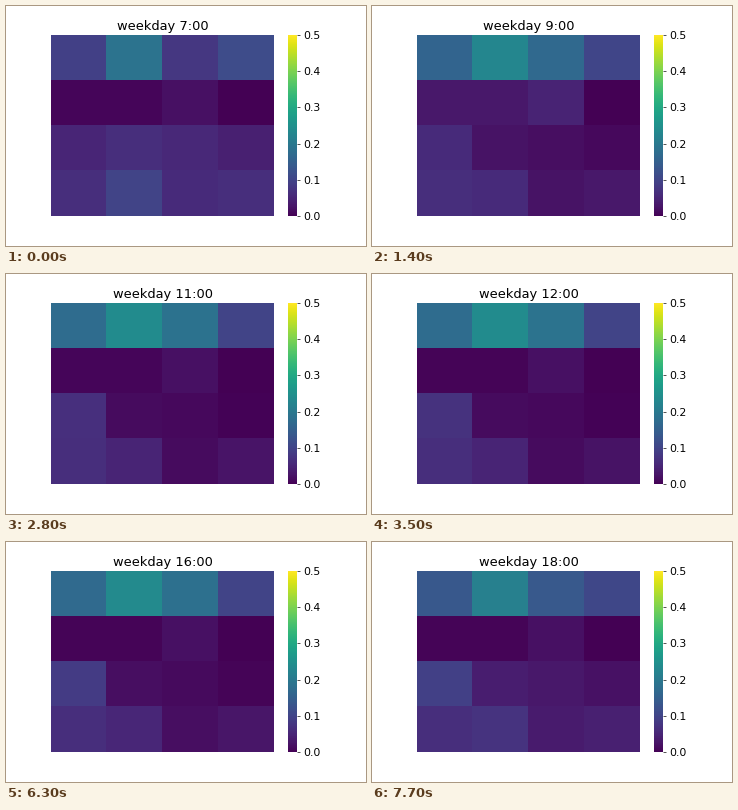
These frames come from a looping animation (360x240 px, 8000 ms). A matplotlib script:

```python
import numpy as np
import matplotlib.pyplot as plt
from matplotlib.animation import FuncAnimation

plt.rcParams.update({
    "font.family": "DejaVu Sans",
    "font.size": 13,
    "text.kerning_factor": 6,
    "figure.subplot.bottom": 0.125,
    "pcolormesh.snap": False,
})

FIRST_HOUR, STEPS, TICK_MS, LOOP_MS = 7, 7, 100, 8000

# Midday level of each cell and its shift towards the ends of the day.
MIDDAY = np.array([[0.175, 0.240, 0.190, 0.100],
                   [0.005, 0.005, 0.020, 0.000],
                   [0.075, 0.015, 0.010, 0.003],
                   [0.065, 0.050, 0.015, 0.025]])
TOP_SHIFT = np.array([-0.08, -0.05, -0.11, 0.015])
LOW_SHIFT = np.array([0.0, 0.05, 0.045, 0.04])


def rates(hour):
    """Flat through midday, bending away at the ends of the day."""
    edge = ((hour - 13) / 6) ** 4
    morning = np.exp(-((hour - 9) / 1.1) ** 2)
    grid = MIDDAY.copy()
    grid[0] += TOP_SHIFT * edge
    grid[1, :3] += 0.028 * morning
    grid[2:] += LOW_SHIFT * edge
    grid[2, 0] += 0.004 * (hour - 13)
    return grid.clip(0)


fig, ax = plt.subplots(figsize=(6, 4), dpi=60)
mesh = ax.pcolormesh(rates(FIRST_HOUR), cmap="viridis", vmin=0, vmax=0.5)
ax.invert_yaxis()
ax.set_axis_off()
title = ax.set_title("")

bar = fig.colorbar(mesh, ax=ax, ticks=np.arange(6) / 10)
bar.outline.set_visible(False)


def update(i):
    hour = FIRST_HOUR + i // STEPS
    mesh.set_array(rates(hour))
    title.set_text(f"weekday {hour}:00")
    return mesh, title


anim = FuncAnimation(fig, update, frames=LOOP_MS // TICK_MS,
                     interval=TICK_MS, repeat=True, repeat_delay=0)
plt.show()
```
